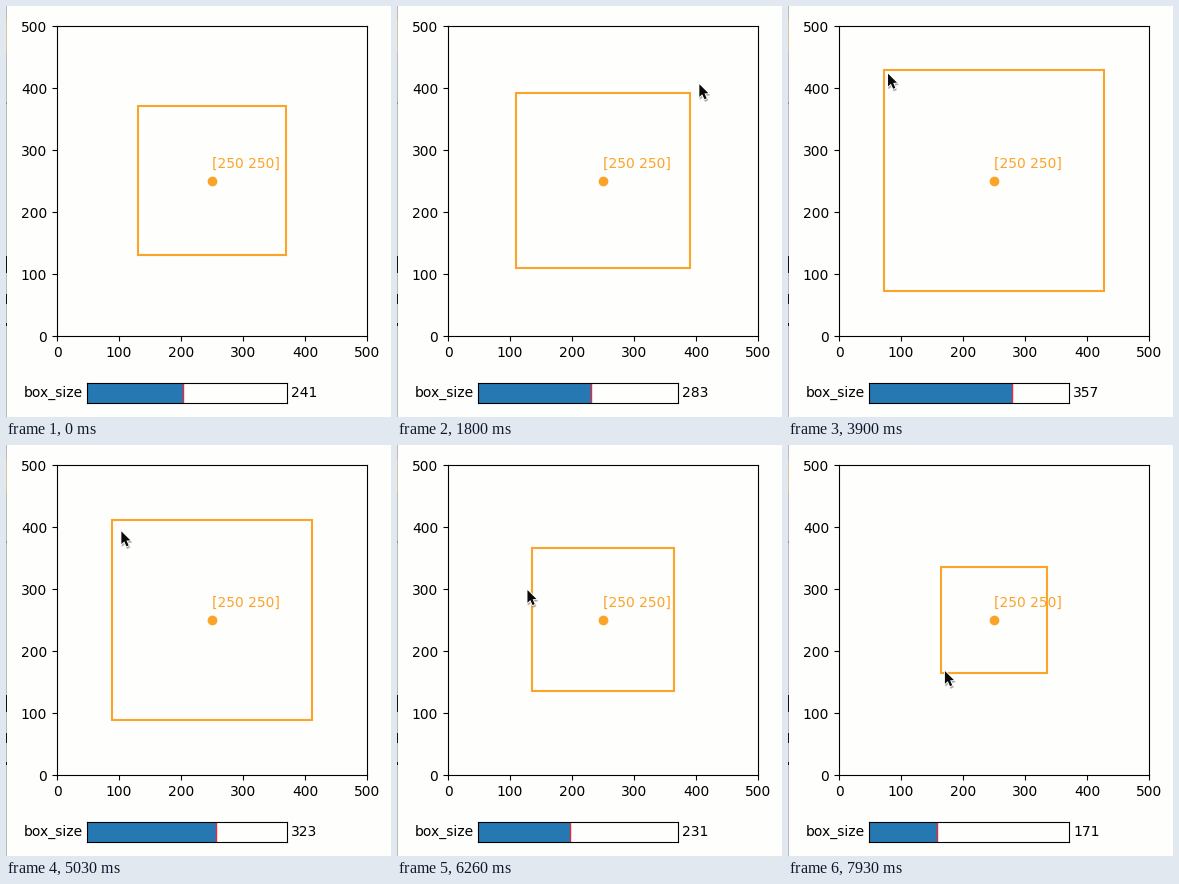
These frames come from a looping animation (385 by 411 pixels, 8 s). A matplotlib script:

```python
import numpy as np
import matplotlib.pyplot as plt
from matplotlib.animation import FuncAnimation
from matplotlib.patches import Polygon, Rectangle

W, H, DPI = 385, 411, 100
LOOP, STEP = 8000, 32
PAPER, ORANGE, BLUE, RED = "#fefefd", "#fca329", "#2578b2", "#e8283c"
CENTER = 250
ENTER = 30

plt.rcParams["font.family"] = "DejaVu Sans"
plt.rcParams["font.size"] = 10

# each move: start ms, end ms, pointer goal in pixels, sideways bow, box size
START, START_SIZE = (402, 134), 241
MOVES = [
    (-40, 560, (277, 101), 0, 241),
    (1260, 2330, (317, 65), 0, 357),
    (3300, 3930, (95, 67), 8, 357),
    (4630, 5630, (134, 104), 0, 231),
    (6060, 6980, (133, 248), -4, 231),
    (7330, 7930, (157, 226), 0, 169),
]


def state(t):
    """Pointer tip and box size; the box trails the hand while dragged."""
    tip, size = np.array(START, float), START_SIZE
    for begin, end, goal, bow, next_size in MOVES:
        u = np.clip((t - begin) / (end - begin), 0, 1)
        hand = 1 - (1 - u) ** 1.4
        dx, dy = way = np.array(goal) - tip
        side = np.array([dy, -dx]) / np.hypot(dx, dy)
        if u < 1:
            tip = tip + hand * way + 4 * hand * (1 - hand) * bow * side
            return tip, size + (next_size - size) * u ** 1.5
        tip, size = tip + way, next_size
    return tip, size


fig = plt.figure(figsize=((W + 0.001) / DPI, (H + 0.001) / DPI), dpi=DPI,
                 facecolor=PAPER)


def pixel_axes(left, top, right, bottom):
    box = [left / W, 1 - bottom / H, (right - left) / W, (bottom - top) / H]
    return fig.add_axes(box, facecolor=PAPER)


# plot
ax = pixel_axes(51, 20, 361, 330)
ax.set(xlim=(0, 500), ylim=(0, 500),
       xticks=range(0, 501, 100), yticks=range(0, 501, 100))
ax.plot(CENTER, CENTER, "o", color=ORANGE)
ax.text(CENTER, CENTER + 21.5, "[250 250]", color=ORANGE)
box = ax.add_patch(Rectangle((0, 0), 1, 1, fill=False, ec=ORANGE, lw=1.5))

# slider
bar = pixel_axes(81, 377, 281, 397)
bar.set(xlim=(0, 500), ylim=(0, 1), xticks=[], yticks=[])
fill = bar.add_patch(Rectangle((0, 0), 1, 1, fc=BLUE, ec="none"))
mark = bar.axvline(0, color=RED, lw=1)
bar.text(-0.02, 0.5, "box_size", transform=bar.transAxes,
         ha="right", va="center")
value = bar.text(1.02, 0.5, "", transform=bar.transAxes,
                 ha="left", va="center")

# window edge and pointer, in pixels
top = pixel_axes(0, 0, W, H)
top.set(xlim=(0, W), ylim=(H, 0))
top.axis("off")
for y, height, color in [(0, H, "#b9b9b9"), (14, 33, "#d9c3a0"),
                         (96, 2, "#8c8c8c"), (250, 17, "#111111"),
                         (288, 10, "#111111"), (317, 3, "#111111")]:
    top.add_patch(Rectangle((0, y), 1, height, fc=color, ec="none"))

ARROW = 0.9 * np.array([(0, 0), (0, 14.2), (3.2, 11.2), (5.7, 16.8),
                        (8.1, 15.7), (5.7, 10.3), (10, 10)])


def arrow(color, edge, alpha=1):
    return top.add_patch(Polygon(ARROW, fc=color, ec=color, lw=edge,
                                 alpha=alpha, joinstyle="round"))


shadow, rim, core = arrow("black", 1.2, 0.22), arrow("white", 1.3), arrow("#0a0a0a", 0)


def draw(n):
    t = (n + 0.5) * STEP
    tip, size = state(t)
    half = int(size) // 2
    size = 2 * half + 1
    box.set_bounds(CENTER - half, CENTER - half, size - 1, size)
    fill.set_width(size)
    mark.set_xdata([size, size])
    value.set_text(str(size))

    for part, shift in [(shadow, (0.8, 1.8)), (rim, (0, 0)), (core, (0, 0))]:
        part.set_xy(ARROW + tip + shift)
        part.set_visible(t >= ENTER)
    return box, fill, mark, value, shadow, rim, core


anim = FuncAnimation(fig, draw, frames=LOOP // STEP, interval=STEP,
                     init_func=lambda: draw(0), repeat=True, repeat_delay=0)
plt.show()
```
